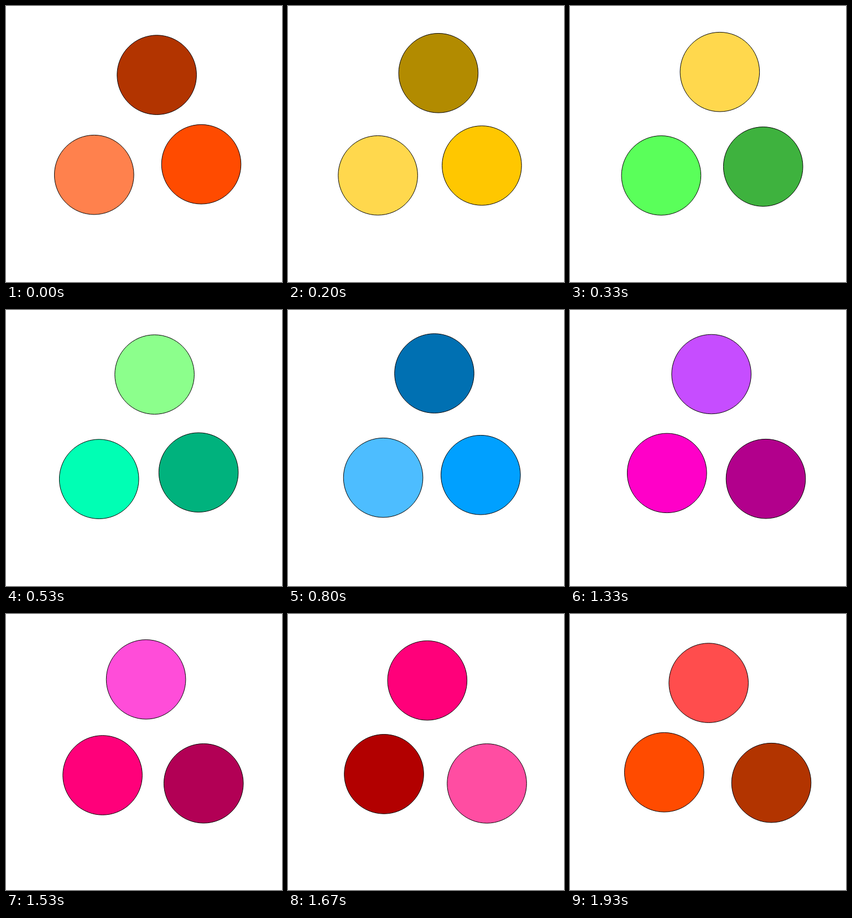
An HTML page with a canvas that plays this animation: 499 by 499 pixels, repeating every 1.99 s.

```html
<!DOCTYPE html>
<html lang="en">
<head>
<meta charset="utf-8">
<title>Three circles</title>
<style>
html, body { margin: 0; width: 100%; height: 100%; overflow: hidden; background: #fff; }
canvas { display: block; }
</style>
</head>
<body>
<canvas id="stage" width="499" height="499"></canvas>
<script>
const ctx = document.getElementById('stage').getContext('2d');
const LOOP = 1990, RADIUS = 71.8, ORBIT = 11;

// Orbit centres: top, left, right
const slots = [[261.65, 125.2], [164.3, 295.4], [359, 295.4]];
const palette = [
  [255, 75, 0], [255, 199, 0], [90, 255, 90], [0, 255, 180], [0, 160, 255],
  [90, 0, 255], [174, 0, 255], [255, 0, 200], [255, 0, 122], [255, 0, 0]
];
const shades = [
  v => v * 0.7,        // dark
  v => 77 + v * 0.7,   // light
  v => v               // plain
];

// Fifteen steps a second, with starts rounded to 10 ms
function stepAt(ms) {
  const rest = ms % 200;
  return 3 * Math.floor(ms / 200) + (rest >= 70) + (rest >= 130);
}

function drawCircle(step, ball) {
  const slot = (step + ball) % 3;
  const angle = (3 + 6 * step + 240 * slot) * Math.PI / 180;
  // Each ball takes its next colour on reaching the left slot
  const turn = Math.floor((step + (ball + 2) % 3) / 3) % palette.length;
  const rgb = palette[turn].map(v => Math.floor(shades[ball](v)));
  const [x, y] = slots[slot];
  ctx.beginPath();
  ctx.arc(x + ORBIT * Math.cos(angle), y - ORBIT * Math.sin(angle), RADIUS, 0, 2 * Math.PI);
  ctx.fillStyle = `rgb(${rgb})`;
  ctx.fill();
  ctx.stroke();
}

const start = performance.now();
function draw() {
  const step = stepAt(Math.max(0, performance.now() - start) % LOOP);
  ctx.fillStyle = '#fff';
  ctx.fillRect(0, 0, 499, 499);
  for (let ball = 0; ball < 3; ball++) drawCircle(step, ball);
  requestAnimationFrame(draw);
}
draw();
</script>
</body>
</html>
```
